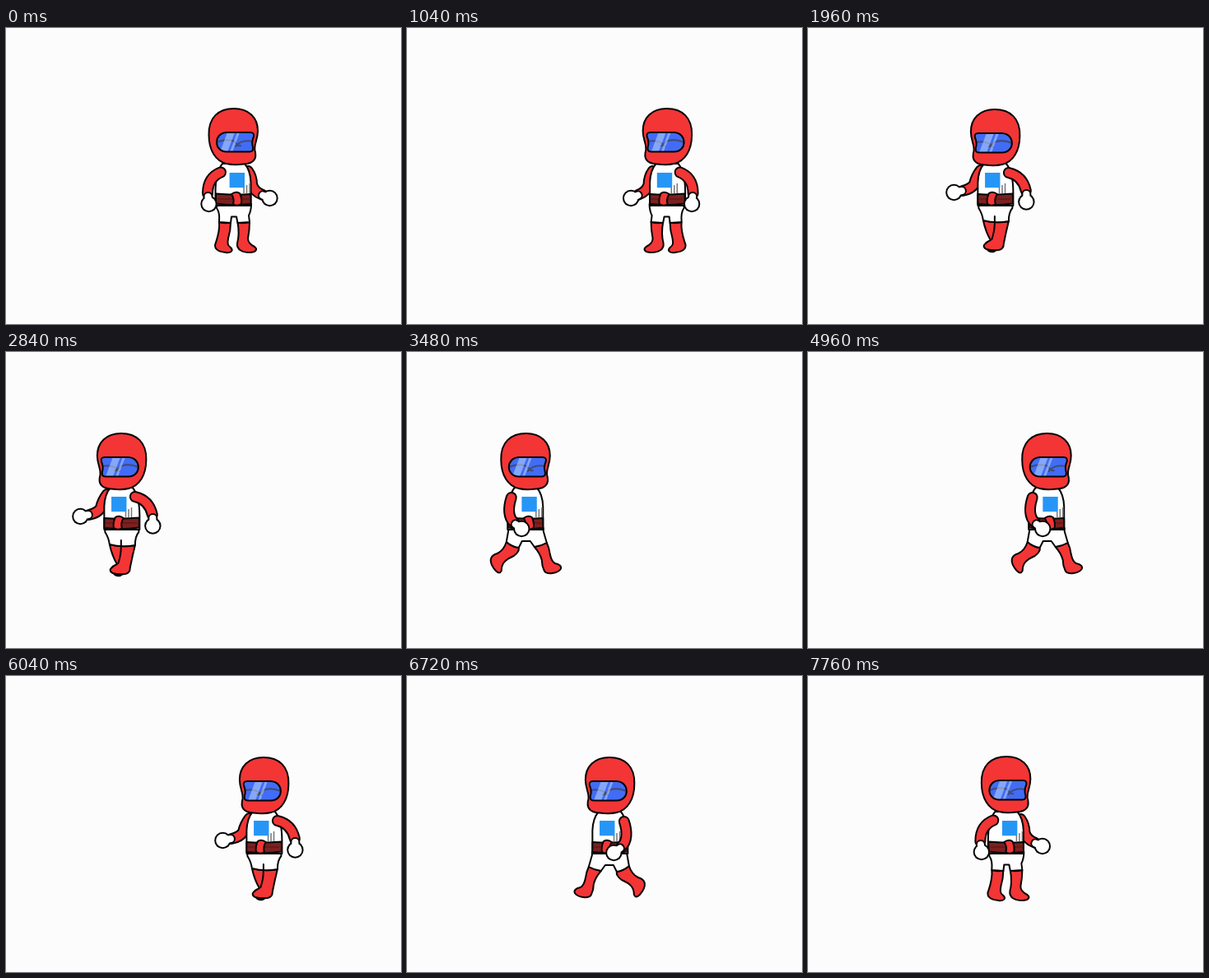
An HTML page with a canvas for the animation above (8640 ms loop, 480 px wide and 360 px high).

```html
<!DOCTYPE html>
<html lang="en">
<head>
<meta charset="utf-8">
<title>Walking racer</title>
<style>
html, body { margin: 0; width: 100%; height: 100%; overflow: hidden; background: #fcfcfc; }
canvas { display: block; }
</style>
</head>
<body>
<canvas id="stage" width="480" height="360"></canvas>
<script>
const ctx = document.getElementById('stage').getContext('2d');
const RED = '#f33535', WHITE = '#fff', INK = '#050505';
const STEP = 40, FRAMES = 216;

// All shapes face right, with x measured from the middle of the helmet.
const HELMET = 'M-29.5 130C-30 109 -18 98 1 98C19 98 30 109 30 125C30 137 25 141 26.5 149C29 158 26 165 13 165.5Q0 167 -8 165C-21 162 -29.5 149 -29.5 130Z';
const VISOR = 'M-8 127H21Q26 127 25 132Q22 139 24 145Q25 150.5 20 150.5H-8C-24 150 -24 128 -8 127Z';
const TORSO = 'M-13 165C-18 171 -21.5 180 -21.5 200V216H21.5V188Q21 173 14 165Z';
const BELT = 'M-21 201.5Q0 203.5 21.5 202V214Q0 216.5 -21 213.5Z';
const BUCKLE = 'M-2 202Q3 198 8 201Q11 207 10 214Q5 217 0 214.5Q2 208 -2 202Z';

// "dip" lowers the helmet and arms against the torso and legs.
const POSES = {
  idle: {
    dip: 0,
    pants: 'M-20 214V219Q-16 224 -17 236L-3 237L-2 229.5H4L5.5 237L20 236L19 228Q22 222 22 214',
    boots: [
      'M-17 236C-16 245 -18 252 -21 261C-24 267 -20 272 -9 273C-1 274 0 270 -3 267C-7 264 -7 262 -6 256Q-3 246 -3 236.5Q-10 238 -17 236Z',
      'M5.5 236.5Q8 250 5 262C4 270 12 273 20 273C28 273 30 269 26 266C20 263 18 260 18 256Q20 246 20 236Q12 238 5.5 236.5Z'
    ],
    back: 'M-15 175.5C-26 180 -31 189 -31 201',
    backHand: [-29.5, 214, -30.5, 205],
    front: 'M18 174Q23 181 23 190Q25 199 36 203',
    frontHand: [44.5, 207, 36, 203.5]
  },
  pass: {
    dip: 1,
    pants: 'M-20.5 214V219Q-16 224 -16 235Q0 238 15 234Q16 226 20.5 219V214',
    boots: [
      'M-6 262Q-3 270 2 272Q8 273 10 269L8 262Z',
      'M15 234Q8 236 1 236Q-8 237 -16 235Q-13 247 -10 262Q-10 269 -4 270Q4 271 11 269Q15 267 14 264Q11 260 6 258Q12 248 15 234Z'
    ],
    seam: 'M1 229V236Q1 247 4.5 257',
    back: 'M-16 175Q-33 179 -37 197',
    backHand: [-37.5, 210.5, -37.5, 201],
    front: 'M18 172Q24 180 26 189Q30 195 40 197',
    frontHand: [50.5, 199, 41, 197]
  },
  stride: {
    dip: 1,
    pants: 'M-20 214L-23 231Q-16 237 -8 238L-4 230H6L11 237Q19 236 26 232L22 218V214',
    boots: [
      'M-23 231Q-16 237 -8 238Q-7 243 -14 248Q-23 252 -26 256Q-29 260 -29 266Q-31 271 -36 266Q-43 258 -42 252Q-41 247 -34 245Q-26 241 -23 231Z',
      'M11 237Q19 236 26 232Q29 238 30 246Q32 255 36 257Q45 259 43 264Q40 268 33 269Q25 270 23 266Q20 260 20 253Q18 245 11 237Z'
    ],
    back: 'M-17 176C-21 188 -21 200 -14 206',
    backHand: [-4.5, 214, -12, 208.5]
  }
};

function shape(d, fill, width = 2, color = INK) {
  const path = new Path2D(d);
  if (fill) { ctx.fillStyle = fill; ctx.fill(path); }
  if (width) { ctx.lineWidth = width; ctx.strokeStyle = color; ctx.stroke(path); }
}

function arm(d, hand, dip) {
  ctx.save();
  ctx.translate(0, dip);
  shape(d, null, 14);
  shape(d, null, 10, RED);
  const [x, y, cx, cy] = hand;
  for (const [color, grow] of [[INK, 1], [WHITE, -1]]) {
    ctx.fillStyle = color;
    ctx.beginPath();
    ctx.arc(x, y, 9.2 + grow, 0, 7);
    ctx.fill();
    shape(`M${cx} ${cy}L${x} ${y}`, null, 10 + 2 * grow, color);
  }
  ctx.restore();
}

function decals(dir) {
  ctx.save();
  ctx.scale(dir, 1); // printed marks keep their reading direction
  const x = dir * 4.2 + .6;
  ctx.fillStyle = '#2596f6';
  ctx.fillRect(x - 9.2, 176, 18.4, 18.2);
  ctx.fillStyle = '#777';
  [7, 10, 12].forEach((h, i) => ctx.fillRect(x + 7.5 + 3.5 * i, 201 - h, 1.5, h));
  ctx.restore();
}

function head(dir, dip) {
  ctx.save();
  ctx.translate(0, dip);
  shape(HELMET, RED);
  shape(VISOR, '#416cf7', 0);
  ctx.save();
  ctx.clip(new Path2D(VISOR));
  shape('M-20 139Q-8 134 2 138Q5 144 9 143M3 144Q10 135 24 138', null, 2.2, '#414d78');
  ctx.scale(dir, 1);
  ctx.translate(2 * dir - 2, 0);
  shape('M-16 151L-7 127H2L-7 151ZM-4 151L5 127H8L-1 151Z', 'rgba(190,215,255,.55)', 0);
  ctx.restore();
  shape(VISOR);
  ctx.restore();
}

function draw({ x, dir, pose }) {
  const p = POSES[pose];
  ctx.fillStyle = '#fcfcfc';
  ctx.fillRect(0, 0, 480, 360);
  ctx.save();
  ctx.translate(x, 0);
  ctx.scale(dir, 1);
  ctx.lineJoin = ctx.lineCap = 'round';
  if (p.front) arm(p.front, p.frontHand, p.dip);
  p.boots.forEach(d => shape(d, RED));
  shape(p.pants, WHITE);
  if (p.seam) shape(p.seam);
  shape(TORSO, WHITE);
  decals(dir);
  shape(BELT, '#7c2020');
  shape('M-18 208H20', null, 1, '#541212');
  shape(BUCKLE, RED);
  arm(p.back, p.backHand, p.dip);
  head(dir, p.dip);
  ctx.restore();
}

// Steering: [first step, push]; speed builds up and fades by friction.
const STEERING = [[1, 1], [12, 0], [23, -1], [77, .3], [78, 1], [139, -.5], [140, -1],
  [173, 0], [177, 1], [182, 0]];
const FRICTION = .7, PUSH = 1.695, CYCLE = 880 / 3;

function gait(t) {
  const phase = t % CYCLE;
  return phase < 95 ? 'idle' : phase < 205 ? 'pass' : phase < 290 ? 'stride' : 'idle';
}

function simulate() {
  let x = 276, v = 3, dir = 1, push = 1, start = -4;
  const steps = [{ x, dir, pose: 'idle' }];
  for (let i = 1; i < FRAMES; i++) {
    const change = STEERING.find(s => s[0] === i);
    if (change) {
      if (!push) start = i;
      push = change[1];
    }
    v = (v + PUSH * push) * FRICTION;
    if (!push && Math.abs(v) < .4) v = 0;
    x += v;
    if (push) dir = Math.sign(push);
    const walking = push && i - start >= 5;
    steps.push({ x, dir, pose: walking ? gait(i * STEP) : 'idle' });
  }
  return steps;
}

const steps = simulate();
const begin = performance.now();
function tick() {
  const t = Math.max(0, performance.now() - begin);
  draw(steps[Math.floor(t / STEP) % FRAMES]);
  requestAnimationFrame(tick);
}
tick();
</script>
</body>
</html>
```
